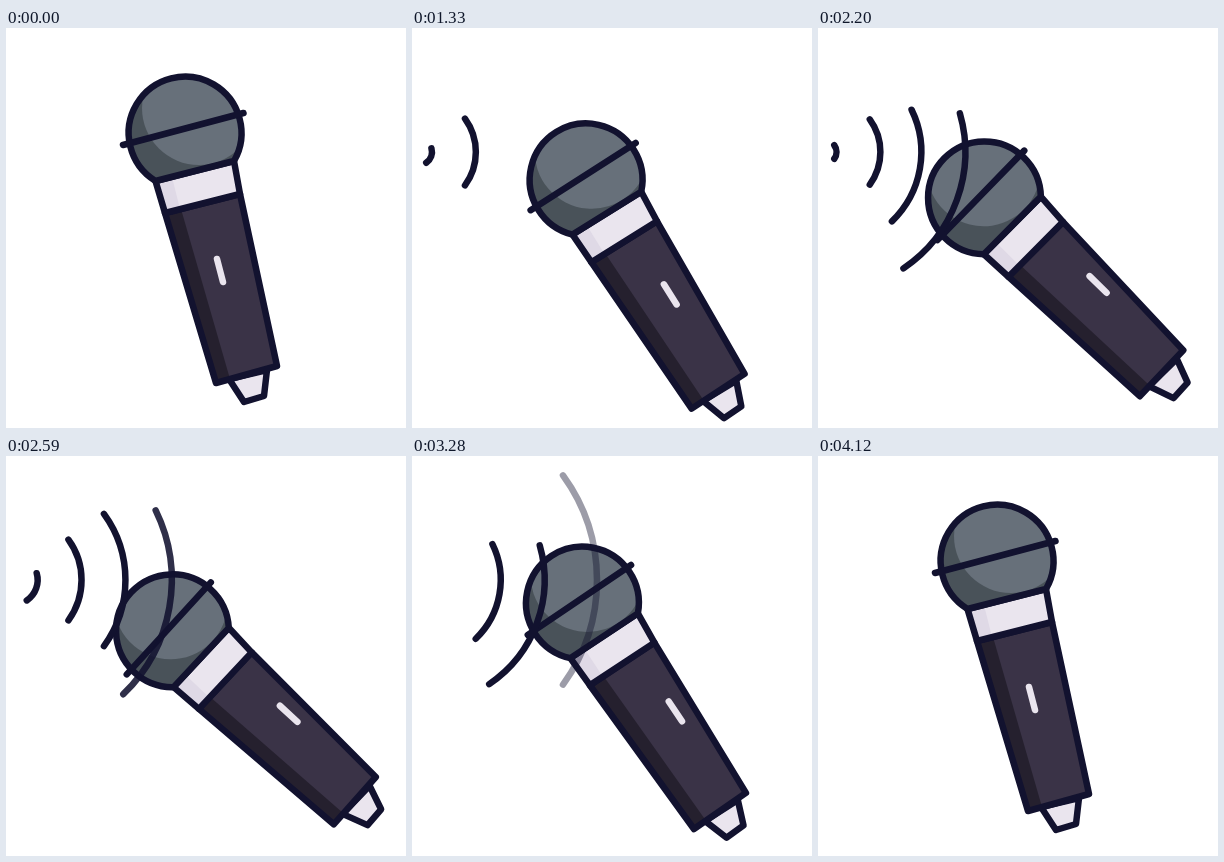
Write an HTML page that moves like this. It is 400 by 400 pixels and loops after 4150 ms.

```html
<!DOCTYPE html>
<html lang="en">
<head>
<meta charset="utf-8">
<title>Microphone</title>
<style>
  html, body { margin: 0; width: 100%; height: 100%; overflow: hidden; background: #fff; }
  svg { display: block; width: 100%; height: 100%; }
  .line { fill: none; stroke: #12122f; stroke-width: 6.5; stroke-linecap: round; stroke-linejoin: round; }
</style>
</head>
<body>
<svg viewBox="0 0 400 400">
  <defs>
    <path id="head" d="M149.500 153A56.400 56.400 0 1 1 228 133Z"/>
    <clipPath id="inHead"><use href="#head"/></clipPath>
  </defs>
  <g id="mic">
    <path class="line" style="fill:#eae5ee" d="M223 351L238 374 258 368 261 342Z"/>
    <path fill="#3a3347" d="M159 185L234 166 271 338 210 355Z"/>
    <path fill="#25202e" d="M159 185L175 181 224 351 210 355Z"/>
    <path id="slit" class="line" style="stroke:#eae5ee" d="M211 231L217 254"/>
    <path class="line" d="M159 185L234 166 271 338 210 355Z"/>
    <path fill="#eae5ee" d="M149.500 153L228 133 234 166 159 185Z"/>
    <path fill="#dfd9e6" d="M149.500 153L166 149 174 181 159 185Z"/>
    <path class="line" d="M149.500 153L228 133 234 166 159 185Z"/>
    <use href="#head" fill="#495259"/>
    <circle cx="193" cy="80" r="57" fill="#67707a" clip-path="url(#inHead)"/>
    <use href="#head" class="line"/>
    <path class="line" d="M117 117L237.500 85"/>
  </g>
  <g id="waves"></g>
</svg>
<script>
const LOOP = 4150;
const REST = [178.5, 105, 0];    // head x, head y, tilt in degrees
const RAISED = [177, 97, 2.1];
const TILTS = [0, 20, 10, 0];    // wave directions, repeating
const SPREAD = 36 * Math.PI / 180;

const byId = id => document.getElementById(id);
const mic = byId('mic'), slit = byId('slit');

const waves = Array.from({ length: 7 }, (_, i) => {
  const path = document.createElementNS('http://www.w3.org/2000/svg', 'path');
  path.setAttribute('class', 'line');
  path.setAttribute('transform', `translate(7 124) rotate(${TILTS[i % 4]})`);
  return byId('waves').appendChild(path);
});

const ease = (t, from, to) => {
  const u = Math.min(1, Math.max(0, (t - from) / (to - from)));
  return (1 - Math.cos(Math.PI * u)) / 2;
};
const mix = (a, b, k) => a.map((v, i) => v + (b[i] - v) * k);

// Tilted pose with a quick bob, a slower sway and a slight drift to the left
function singing(t) {
  const s = Math.max(0, t - 1660);
  const swing = period => Math.cos(2 * Math.PI * s / period);
  const drift = ease(s, 0, 540);
  return [170 - 4 * drift, 177.7 + 8.3 * swing(345), -32 + 1.5 * swing(540) - 0.5 * drift];
}

function drawMic(t) {
  let pose = mix(REST, singing(t), ease(t, 1000, 1600));
  pose = mix(pose, RAISED, ease(t, 3040, 3632));
  const [x, y, tilt] = mix(pose, REST, ease(t, 3660, 4120));
  mic.setAttribute('transform',
    `translate(${x} ${y}) rotate(${tilt}) translate(${-REST[0]} ${-REST[1]})`);
  const shift = 18.5 * (ease(t, 1000, 1600) - ease(t, 3200, 3850));
  slit.setAttribute('transform', `translate(${shift * 0.966} ${shift * -0.26})`);
}

function drawWave(path, i, t) {
  const start = 1030 + i * 300 - (i > 2 ? 20 : 0);
  const reach = 12.8 + 0.1463 * (t - start);
  const visible = reach > 8.5 && reach < 183 && t >= 1030;
  path.style.display = visible ? '' : 'none';
  if (!visible) return;
  // Waves speed up briefly as they begin to fade
  const r = reach + Math.min(8.5, Math.max(0, reach - 140) * 0.4);
  const x = r * Math.cos(SPREAD), y = r * Math.sin(SPREAD);
  path.setAttribute('d', `M${x} ${-y}A${r} ${r} 0 0 1 ${x} ${y}`);
  path.style.opacity = Math.min(1, (184 - reach) / 35);
}

function frame() {
  const t = performance.now() % LOOP;
  drawMic(t);
  waves.forEach((path, i) => drawWave(path, i, t));
  requestAnimationFrame(frame);
}
frame();
</script>
</body>
</html>
```
